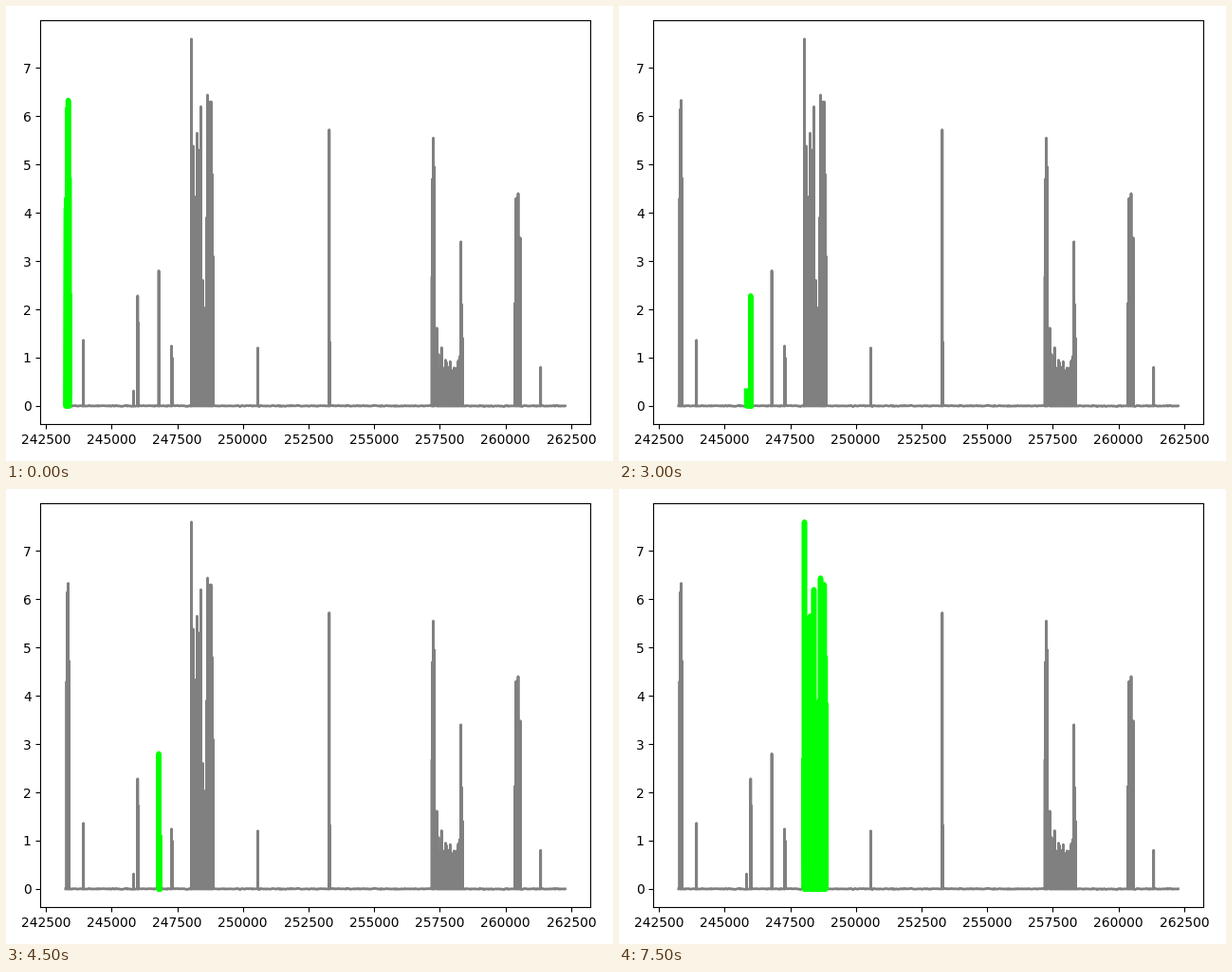
Recreate the animation shown at these times as a matplotlib script. Size 640 px wide and 480 px high, loop 8000 ms.

```python
import numpy as np
import matplotlib.pyplot as plt
from matplotlib.animation import FuncAnimation

GREY, GREEN = "#808080", "#00ff00"
STEP_MS, LOOP_MS, HOLD = 500, 8000, 3  # each event stays lit for HOLD steps
START, END = 243249, 262271
rng = np.random.default_rng(4)


def burst(start, step, *tops):
    """Evenly spaced thin spikes, each from zero up to its top and back."""
    points = []
    for i, top in enumerate(tops):
        t = start + i * step
        points += [(t - 2, 0), (t, top), (t + 2, 0)]
    return points


def flat(t0, t1):
    """Nearly flat signal with a trace of noise."""
    t = np.arange(t0 + 20, t1 - 20, 40)
    return list(zip(t, rng.normal(0, 0.005, len(t))))


def ripple():
    """Tops of a low, fading ripple that swells again at its end."""
    u = np.arange(0, 890, 30)
    fade = 0.9 * np.exp(-u / 350) * np.cos(np.pi * u / 172) ** 4
    return 0.57 + fade + 0.35 * (u / 870) ** 8 + rng.uniform(0, 0.15, len(u))


bursts = [
    burst(243291, 30, 4.3, 6.15, 6.33, 4.72),
    burst(243931, 0, 1.36),
    burst(245840, 0, 0.31),
    burst(245994, 25, 2.28, 1.72),
    burst(246799, 16, 2.8, 1.0),
    burst(247284, 23, 1.24, 1.0),
    burst(248042, 72, 7.6, 5.38, 4.33, 5.65, 5.3, 6.2, 2.6, 2.03, 3.9),
    burst(248656, 35, 6.44, 6.28, 6.28, 6.3, 6.3, 4.8, 3.1),
    burst(250569, 0, 1.2),
    burst(253289, 15, 5.72, 1.32),
    burst(257202, 16, 2.68, 4.7),
    burst(257253, 40, 5.55, 4.95),
    burst(257387, 30, *ripple()),
    burst(258304, 33, 3.4, 2.1, 1.4),
    burst(260364, 40, 2.13, 4.3, 4.2, 4.4, 3.48, 3.48),
    burst(261340, 0, 0.8),
]

signal = [(START, 0)]
for spikes in bursts:
    signal += flat(signal[-1][0], spikes[0][0]) + spikes
signal += flat(signal[-1][0], END) + [(END, 0)]


def event(head, tail):
    """The stretch of signal between a leading and a trailing stroke."""
    t0, t1 = head[-1][0], tail[0][0]
    return np.array(head + [p for p in signal if t0 < p[0] < t1] + tail)


events = [
    event([(243270, 4.04), (243252, 0)], [(243396, 2.3), (243400, 0.25)]),
    event([(243931, 1.36)], [(243932, 0.145)]),
    event([(245840, 0.31)], [(246000, 0)]),
    event([(246792, 1.5)], [(246830, 1.1), (246836, 0)]),
    event([(247287, 1.24)], [(247288, 0.05), (247309, 1), (247310, 0.05)]),
    event([(248031, 2.65), (248036, 0.5)], [(248866, 0.16), (248862, 3.8)]),
]

fig, ax = plt.subplots(figsize=(6.4, 4.8), dpi=100)
ax.plot(*np.array(signal).T, color=GREY, lw=2)
ax.set_xlim(242295, 263219)
ax.set_ylim(-0.381, 7.99)
fig.tight_layout()
lit, = ax.plot([], [], color=GREEN, lw=4)


def update(i):
    lit.set_data(*events[i // HOLD].T)
    return lit,


anim = FuncAnimation(fig, update, frames=LOOP_MS // STEP_MS,
                     interval=STEP_MS, repeat=True, repeat_delay=0)
plt.show()
```
